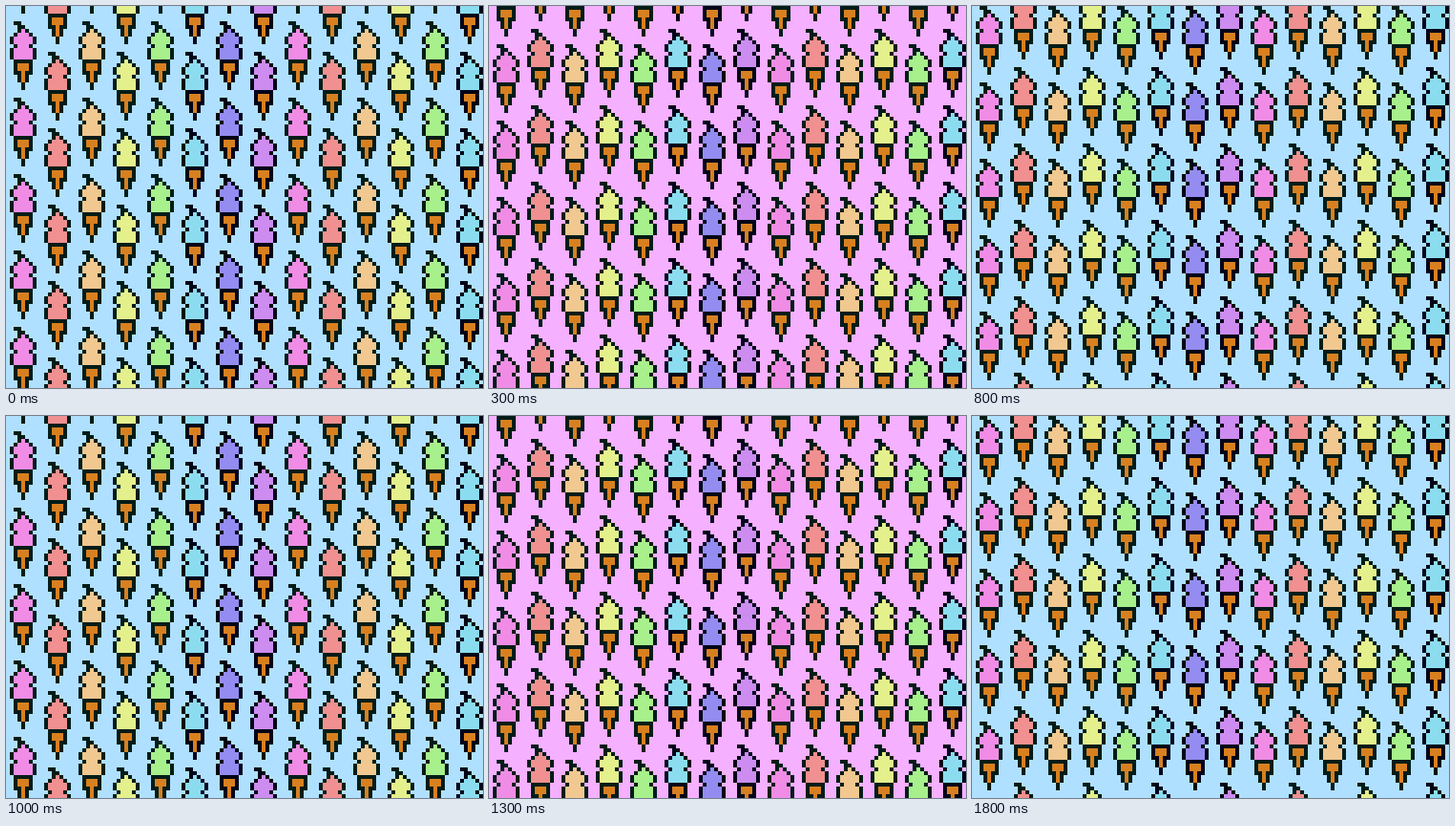
Recreate the animation shown at these times as an HTML page with a canvas. Size 500 by 400 pixels, loop 1900 ms.

```html
<!DOCTYPE html>
<html lang="en">
<head>
<meta charset="utf-8">
<title>Ice cream pattern</title>
<style>
  html, body { margin: 0; width: 100%; height: 100%; overflow: hidden; background: #b0e0ff; }
  canvas { display: block; }
</style>
</head>
<body>
<canvas id="stage" width="500" height="400"></canvas>
<script>
const ctx = document.getElementById("stage").getContext("2d");

const PIXEL = 4;
const COLUMN_STEP = 36;
const ROW_STEP = 80;
const STEP_MS = 100;
const STEPS = 19;
const BACKGROUNDS = ["#b0e0ff", "#f5b0ff"];
const FLAVOURS = [
  "#f08ce6", "#f09090", "#f0c890", "#e4f08c",
  "#a8f08c", "#8cdcf0", "#948cf0", "#cc8cf0"
];

// K outline, F ice cream, O cone
const CONE = [
  ".KK....",
  "..KK...",
  "..KFK..",
  ".KFFFK.",
  "KFFFFFK",
  "KFFFFFK",
  ".KFFFK.",
  "KFFFFFK",
  "KFFFFFK",
  "KFFFFFK",
  ".KKKKK.",
  ".KOOOK.",
  ".KOOOK.",
  ".KKOKK.",
  "..KOK..",
  "..KOK..",
  "...K...",
  "...K..."
];

function makeSprite(flavour, index) {
  const sprite = document.createElement("canvas");
  sprite.width = CONE[0].length * PIXEL;
  sprite.height = CONE.length * PIXEL;
  const pen = sprite.getContext("2d");
  const inks = { K: index < 5 ? "#001c18" : "#000418", F: flavour, O: "#d88020" };
  CONE.forEach((row, y) => [...row].forEach((key, x) => {
    if (key === ".") return;
    pen.fillStyle = inks[key];
    pen.fillRect(x * PIXEL, y * PIXEL, PIXEL, PIXEL);
  }));
  return sprite;
}

const sprites = FLAVOURS.map(makeSprite);

function draw(step) {
  ctx.fillStyle = BACKGROUNDS[step % 2];
  ctx.fillRect(0, 0, 500, 400);
  for (let column = 0; column < 14; column++) {
    // Neighbouring columns scroll in opposite directions.
    const shift = column % 2 ? 48 - 8 * step : 16 + 8 * step;
    const top = ((shift % ROW_STEP) + ROW_STEP) % ROW_STEP - ROW_STEP;
    for (let y = top; y < 400; y += ROW_STEP) {
      ctx.drawImage(sprites[column % sprites.length], 4 + column * COLUMN_STEP, y);
    }
  }
}

const start = performance.now();
function tick() {
  const elapsed = Math.max(0, performance.now() - start);
  draw(Math.floor(elapsed / STEP_MS) % STEPS);
  requestAnimationFrame(tick);
}
draw(0);
requestAnimationFrame(tick);
</script>
</body>
</html>
```
